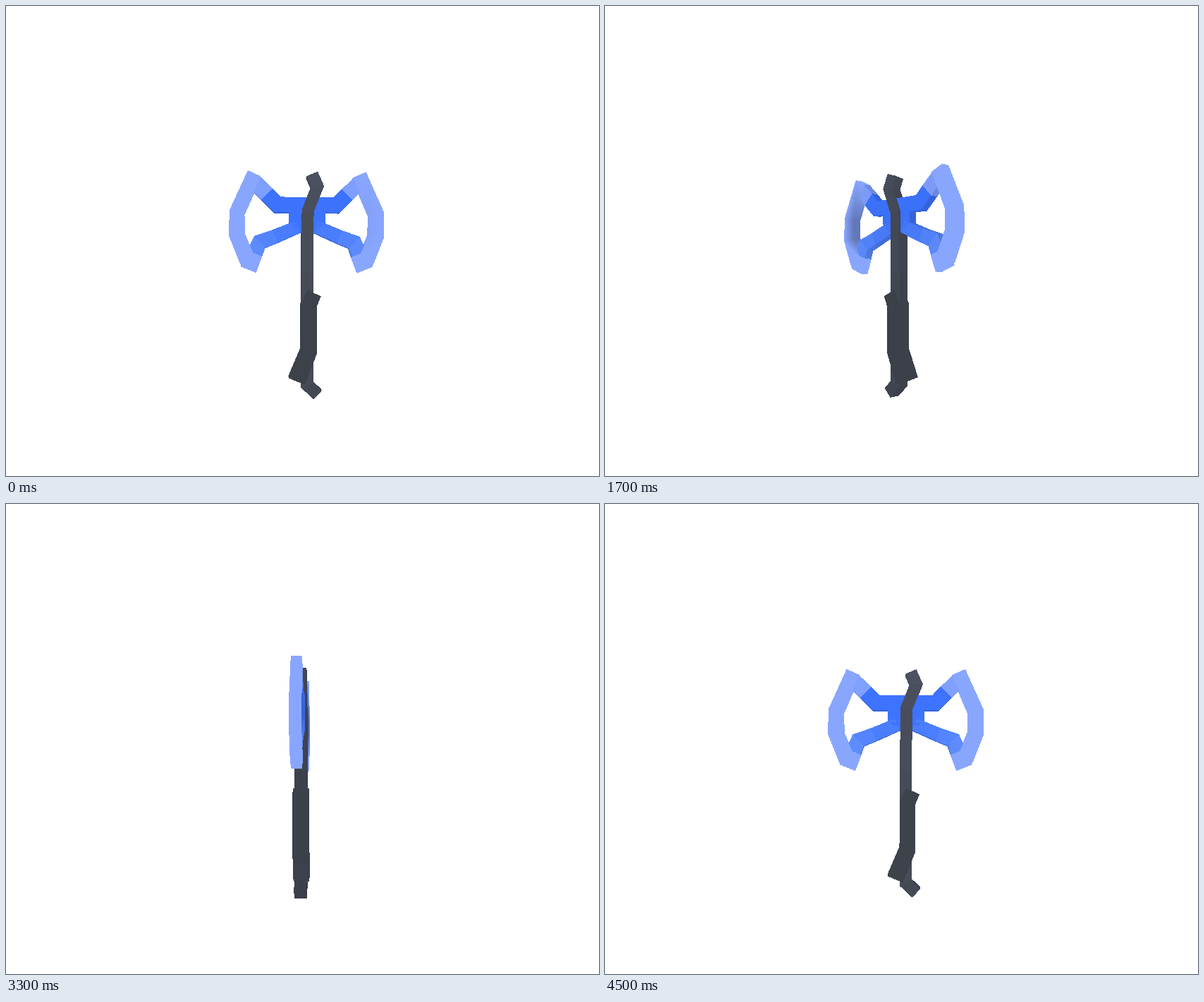
Animation, 841 px wide and 666 px high, one loop 4.55 s. Source, as an HTML page with a canvas:

```html
<!DOCTYPE html>
<html lang="en">
<head>
<meta charset="utf-8">
<title>Turning axe</title>
<style>
html, body { margin: 0; width: 100%; height: 100%; overflow: hidden; background: #fff; }
canvas { display: block; }
</style>
</head>
<body>
<canvas width="841" height="666"></canvas>
<script>
const ctx = document.querySelector('canvas').getContext('2d');
const CX = 420.5, CY = 333, MID = 426.75, DIST = 790;
const PITCH = Math.atan(70 / DIST), SIN = Math.sin(PITCH), COS = Math.cos(PITCH);
const LOOP = 4550, STEP = 50, TURN = 2 * Math.PI;

// Drawing area that holds the whole model
const X0 = 290, Y0 = 200, W = 264, H = 372;
const img = ctx.createImageData(W, H);
const pix = new Uint32Array(img.data.buffer);
const depth = new Float32Array(W * H);

// back and front z, light lost on turned fronts, light of side faces, shadow on joints facing the shaft
const material = (back, front, tilt, side, shadow) => ({ back, front, tilt, side, shadow });
const blade = material(-5, 9, 0, 1, 0.42);
const arm = material(-4.5, 8.5, 0.1, 0.86, 0);
const shaft = material(-7, 10, 0.26, 0.87, 0);
const grip = material(-9.5, 12.5, 0.06, 0.97, 0);

const PALE = [137, 166, 255], BLUE = [61, 115, 255];
const mix = (a, b, t) => a + (b - a) * t;
const faces = [];

// Front view point to model space
function lift(x, y, z) {
  const v = (CY - y) / DIST;
  const up = (v * (DIST - z * COS) - z * SIN) / (COS - v * SIN);
  return [(MID + x - CX) * (DIST + up * SIN - z * COS) / DIST, up];
}

// A flat bar with mitred joints along a path; x counts from the shaft
function rod(kind, [w0, w1], [c0, c1], path) {
  const last = path.length - 1;
  const normal = i => {
    const [ax, ay] = path[i], [bx, by] = path[i + 1], len = Math.hypot(bx - ax, by - ay);
    return [(by - ay) / len, (ax - bx) / len];
  };
  const corner = (i, sign, z) => {
    const [x, y] = path[i];
    const n = normal(Math.max(0, i - 1)), m = normal(Math.min(last - 1, i));
    const k = sign * mix(w0, w1, i / last) / 2 / (1 + n[0] * m[0] + n[1] * m[1]);
    const ox = (n[0] + m[0]) * k, oy = (n[1] + m[1]) * k;
    const inward = Math.max(0, -ox * Math.sign(x) / Math.hypot(ox, oy));
    const shade = i > 0 && i < last ? kind.shadow * inward * Math.sign(x) : 0;
    return { at: [...lift(x + ox, y + oy, kind.front), z], shade };
  };
  const { back, front } = kind;
  for (let i = 0; i < last; i++) {
    const rgb = c0.map((v, j) => mix(v, c1[j], last > 1 ? i / (last - 1) : 0));
    const add = (side, pts) => faces.push({ kind, rgb, side, pts });
    for (const z of [back, front])
      add(false, [corner(i, 1, z), corner(i + 1, 1, z), corner(i + 1, -1, z), corner(i, -1, z)]);
    for (const s of [1, -1])
      add(true, [corner(i, s, back), corner(i + 1, s, back), corner(i + 1, s, front), corner(i, s, front)]);
    for (const e of [0, last])
      if (e === i || e === i + 1)
        add(true, [corner(e, 1, back), corner(e, -1, back), corner(e, -1, front), corner(e, 1, front)]);
  }
}

for (const s of [-1, 1]) {
  const wing = (kind, widths, colors, path) => rod(kind, widths, colors, path.map(([x, y]) => [s * x, y]));
  wing(blade, [20, 23], [PALE, PALE], [[75, 238], [99.5, 293], [99.5, 324.5], [84, 362]]);
  wing(arm, [21, 22], [[128, 160, 255], PALE], [[75, 249], [57, 266.5]]);
  wing(arm, [22, 21], [BLUE, BLUE], [[57, 266.5], [42, 281.5], [0, 281.5]]);
  wing(arm, [18, 22], [[74, 126, 255], [94, 140, 255]], [[12, 312], [46, 326.5], [67.5, 334.5], [74.5, 351]]);
  wing(blade, [22, 23], [PALE, PALE], [[74.5, 351], [83.5, 373.5]]);
}
rod(arm, [52, 52], [BLUE, BLUE], [[0, 285], [0, 307]]);
rod(arm, [52, 19], [BLUE, BLUE], [[0, 307], [0, 321]]);
rod(shaft, [17, 17], [[77, 82, 97], [69, 73, 84]],
  [[7, 237.5], [14.7, 255], [0.7, 290], [-0.2, 378], [-0.2, 537.5], [14.8, 551.5]]);
rod(grip, [21, 24], [[62, 66, 75], [62, 66, 75]], [[9.7, 407], [2.2, 424], [2.2, 490], [-15.2, 532]]);

function project([x, y, z], c, s) {
  const px = x * c + z * s, pz = z * c - x * s;
  const k = 1 / (DIST + y * SIN - pz * COS);
  return [CX + DIST * px * k - X0, CY - DIST * (y * COS + pz * SIN) * k - Y0, k];
}

// Corners hold x, y, nearness and light
function triangle(a, b, c, rgb) {
  const area = (b[0] - a[0]) * (c[1] - a[1]) - (b[1] - a[1]) * (c[0] - a[0]);
  if (Math.abs(area) < 1e-6) return;
  const left = Math.max(0, Math.floor(Math.min(a[0], b[0], c[0])));
  const right = Math.min(W - 1, Math.ceil(Math.max(a[0], b[0], c[0])));
  const top = Math.max(0, Math.floor(Math.min(a[1], b[1], c[1])));
  const bottom = Math.min(H - 1, Math.ceil(Math.max(a[1], b[1], c[1])));
  for (let y = top; y <= bottom; y++) {
    for (let x = left; x <= right; x++) {
      const px = x + 0.5, py = y + 0.5;
      const u = ((b[0] - px) * (c[1] - py) - (b[1] - py) * (c[0] - px)) / area;
      const v = ((c[0] - px) * (a[1] - py) - (c[1] - py) * (a[0] - px)) / area;
      const w = 1 - u - v;
      if (u < 0 || v < 0 || w < 0) continue;
      const near = u * a[2] + v * b[2] + w * c[2], at = y * W + x;
      if (near <= depth[at]) continue;
      const light = u * a[3] + v * b[3] + w * c[3];
      depth[at] = near;
      pix[at] = (255 << 24 | rgb[2] * light << 16 | rgb[1] * light << 8 | rgb[0] * light) >>> 0;
    }
  }
}

function draw(time) {
  const turn = (Math.floor((time % LOOP) / STEP) + 1) * STEP / LOOP * TURN;
  const angle = turn - 0.02 * Math.sin(turn);
  const c = Math.cos(angle), s = Math.sin(angle);
  pix.fill(0xffffffff);
  depth.fill(0);
  for (const { kind, rgb, side, pts } of faces) {
    const level = side ? kind.side : 1 - kind.tilt * (1 - Math.abs(c));
    const p = pts.map(({ at, shade }) => [...project(at, c, s), level * (1 - Math.max(0, shade * s))]);
    triangle(p[0], p[1], p[2], rgb);
    triangle(p[0], p[2], p[3], rgb);
  }
  ctx.putImageData(img, X0, Y0);
}

const start = performance.now();
function tick() {
  draw(performance.now() - start);
  requestAnimationFrame(tick);
}
tick();
</script>
</body>
</html>
```
